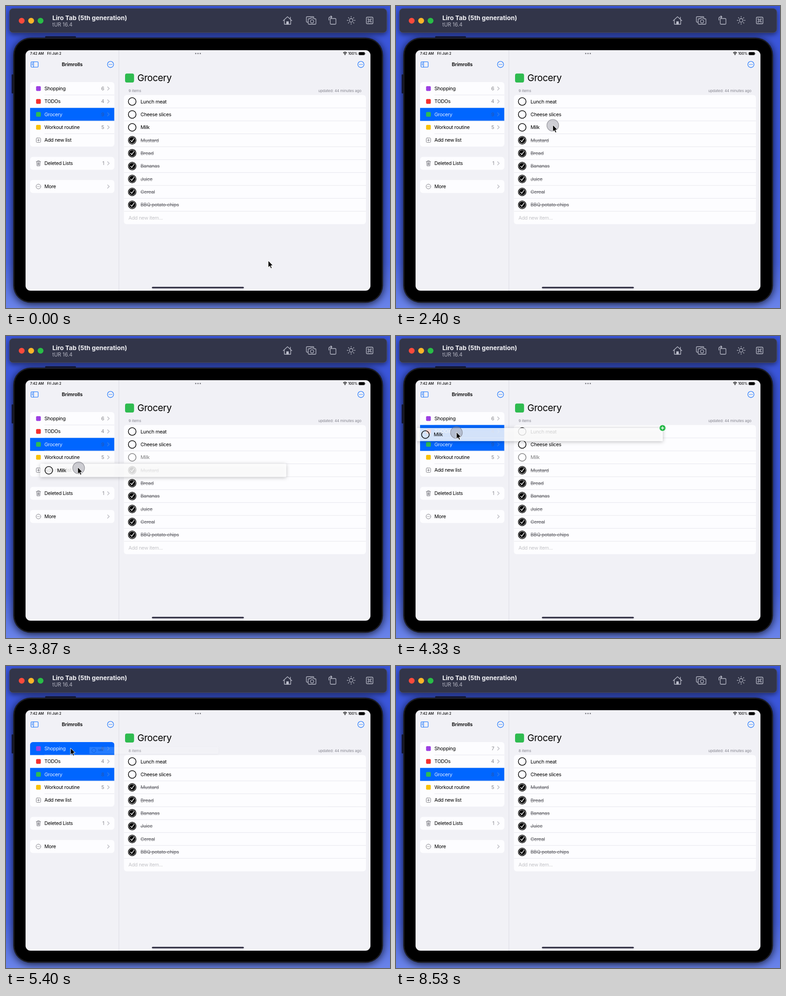
Recreate the animation shown at these times as an HTML page. Size 845 by 663 pixels, loop 8.59 s.

```html
<!DOCTYPE html>
<html lang="en">
<head>
<meta charset="utf-8">
<title>Drag an item to another list</title>
<style>
  html, body { margin: 0; width: 100%; height: 100%; overflow: hidden; background: #3a57dc; }
  svg { display: block; width: 845px; height: 663px; }
  text { font: 400 10.9px Inter, "Open Sans", sans-serif; letter-spacing: -.028em; white-space: pre; }
  .name { font-size: 13.7px; font-weight: 700; fill: #f4f4f8; letter-spacing: 0; }
  .ver { font-size: 11.3px; fill: #b6b7c4; letter-spacing: 0; }
  .stat { font-size: 7.7px; font-weight: 500; letter-spacing: -.01em; }
  .bold { font-weight: 600; letter-spacing: -.01em; }
  .big { font-size: 20.6px; letter-spacing: -.023em; }
  .note { font-size: 8.2px; fill: #85858f; letter-spacing: -.01em; }
  .done { fill: #6c6c72; text-decoration: line-through; }
  .hint { fill: #c3c3c7; }
  .num { fill: #85858b; }
  .line { stroke: #dcdce4; stroke-width: .7; }
  .chev { fill: none; stroke: #b4b4bc; stroke-width: 1.3; stroke-linecap: round; stroke-linejoin: round; }
  .tool { fill: none; stroke: #bcbecb; stroke-width: 1.3; stroke-linejoin: round; stroke-linecap: round; }
  .blue { fill: none; stroke: #0a6cff; stroke-width: 1.1; }
  .gray { fill: none; stroke: #77777e; stroke-width: 1; stroke-linecap: round; }
  .on .label { fill: #e4eeff; }
  .on .num { fill: #2856a8; }
  .on .chev { stroke: #3c82e6; }
</style>
</head>
<body>
<svg id="stage" viewBox="0 0 845 663">
  <defs>
    <linearGradient id="sky" x1="0" y1="0" x2="0" y2="1">
      <stop offset="0" stop-color="#3a55da"/>
      <stop offset=".5" stop-color="#3d5ae0"/>
      <stop offset=".85" stop-color="#4a66e4"/>
      <stop offset="1" stop-color="#6a84ea"/>
    </linearGradient>
    <filter id="deep" x="-5%" y="-5%" width="110%" height="112%">
      <feDropShadow dx="0" dy="3" stdDeviation="9" flood-opacity=".8"/>
    </filter>
    <filter id="barShade" x="-5%" y="-40%" width="110%" height="200%">
      <feDropShadow dx="0" dy="4" stdDeviation="6" flood-opacity=".5"/>
    </filter>
    <filter id="soft" x="-5%" y="-80%" width="110%" height="260%">
      <feDropShadow dx="0" dy="1.5" stdDeviation="4.5" flood-opacity=".32"/>
    </filter>
    <clipPath id="listClip"><rect x="53" y="167" width="185.5" height="141.8" rx="6"/></clipPath>
  </defs>

  <rect width="845" height="663" fill="url(#sky)"/>

  <!-- device -->
  <rect x="16" y="69.5" width="813.5" height="582" rx="38" fill="#15161c" filter="url(#deep)"/>
  <rect x="86" y="66.5" width="68" height="3" rx="1.5" fill="#12152c"/>
  <rect x="12.5" y="150" width="3.5" height="42" rx="1.5" fill="#12152c"/>
  <rect x="18" y="71.5" width="809.5" height="578" rx="36" fill="#000" stroke="#30313a" stroke-width=".8"/>
  <rect x="43" y="97" width="759" height="528" rx="11" fill="#f1f1f6"/>
  <path d="M248.5 97V625" stroke="#dcdce3" stroke-width="1"/>
  <rect x="321" y="616.5" width="202.5" height="3.6" rx="1.8" fill="#353347"/>

  <!-- simulator bar -->
  <rect x="7.5" y="5.5" width="830.5" height="53" rx="8" fill="#323449" stroke="#474a63" stroke-width="1" filter="url(#barShade)"/>
  <circle cx="34.5" cy="32.3" r="6.4" fill="#fb4a3c"/>
  <circle cx="55.3" cy="32.3" r="6.4" fill="#fab529"/>
  <circle cx="76" cy="32.3" r="6.4" fill="#29bd47"/>
  <text class="name" x="102" y="30.5">Liro Tab (5th generation)</text>
  <text class="ver" x="102" y="45">tUR 16.4</text>
  <g class="tool">
    <path d="M610 32.2L619.5 23.5L629 32.2M612.5 30.5V40H626.5V30.5M625.8 28.5V24.5"/>
    <path d="M617.5 40V34.5H621.5V40Z" fill="#bcbecb"/>
    <path d="M664 35.5H662.5Q661 35.5 661 34V25Q661 23.5 662.5 23.5H676Q677.5 23.5 677.5 25"/>
    <path d="M666.5 28H669L670.5 26.3H676.5L678 28H680.5Q682 28 682 29.5V38.5Q682 40 680.5 40H666.5Q665 40 665 38.5V29.5Q665 28 666.5 28Z"/>
    <circle cx="673.5" cy="33.7" r="3.6"/>
    <rect x="713.5" y="27.5" width="12.5" height="12.5" rx="1.5"/>
    <path d="M710.5 31V27.5Q710.5 24 714 24H717M714.8 21.5L717.3 24L714.8 26.5"/>
    <circle cx="759.5" cy="31.5" r="4"/>
    <path id="rays"/>
    <rect x="793" y="24.5" width="14.5" height="14.5" rx="2"/>
    <path stroke-width="1" d="M798.5 30H802V33.5H798.5ZM798.5 30H797.2A1.3 1.3 0 1 1 798.5 28.7ZM802 30V28.7A1.3 1.3 0 1 1 803.3 30ZM802 33.5H803.3A1.3 1.3 0 1 1 802 34.8ZM798.5 33.5V34.8A1.3 1.3 0 1 1 797.2 33.5Z"/>
  </g>

  <!-- status bar -->
  <text class="stat" x="53" y="107">7:42 AM</text>
  <text class="stat" x="90.5" y="107">Fri Jun 2</text>
  <g fill="#808087"><circle cx="417.5" cy="104.3" r="1.5"/><circle cx="422.5" cy="104.3" r="1.5"/><circle cx="427.5" cy="104.3" r="1.5"/></g>
  <g fill="none" stroke="#000" stroke-width="1.3">
    <path d="M742 103Q746 99.3 750 103M743.5 104.8Q746 102.5 748.5 104.8"/>
    <circle cx="746" cy="106.5" r=".5"/>
  </g>
  <text class="stat" x="753" y="107">100%</text>
  <rect x="776" y="101.3" width="13.5" height="6.4" rx="1.8" fill="#000"/>
  <path d="M790.7 103.3V105.7" stroke="#777" stroke-width="1"/>

  <!-- navigation -->
  <g class="blue">
    <rect x="55" y="122.5" width="15.8" height="11.8" rx="1.8"/>
    <path d="M60.7 122.5V134.3M57 125H59M57 127.2H59M57 129.4H59"/>
  </g>
  <text class="bold" x="145.7" y="132.2" text-anchor="middle">Brimrolls</text>
  <g id="nav"></g>
  <rect x="262" y="148.3" width="19.8" height="19.6" rx="4" fill="#2fbb50"/>
  <text class="big" x="289" y="165.3">Grocery</text>
  <text class="note" id="total" x="269.8" y="189.3">9 items</text>
  <text class="note" x="782" y="189.3" text-anchor="end">updated: 44 minutes ago</text>

  <rect x="53" y="167" width="185.5" height="141.8" rx="6" fill="#fdfdff"/>
  <g id="side" clip-path="url(#listClip)"></g>
  <g id="extra"></g>

  <rect id="card" x="259.5" y="195.5" width="532.5" height="283.5" rx="6" fill="#fdfdff"/>
  <g id="items"></g>

  <g id="ghost">
    <rect width="541" height="28.8" rx="1.5" fill="#fff" fill-opacity=".8" filter="url(#soft)"/>
    <circle cx="18.7" cy="14.4" r="8.4" fill="none" stroke="#000" stroke-width="1.5"/>
    <text x="37" y="18.3">Milk</text>
  </g>
  <g id="badge">
    <circle r="7" fill="#27b84a" stroke="#f2faf4" stroke-width="1"/>
    <path d="M-3.5 0H3.5M0 -3.5V3.5" stroke="#fff" stroke-width="1.5"/>
  </g>
  <circle id="touch" r="13" fill="#8c8c98" fill-opacity=".42" stroke="#77777f" stroke-opacity=".75" stroke-width="1.2"/>
  <path id="arrow" d="M0 0V15L3.4 11.9L5.9 17.3L8.3 16.2L5.9 11L10.3 10.7Z" fill="#000" stroke="#fff" stroke-width="1"/>
</svg>

<script>
const LOOP = 8590, ROW = 28.35;
const PRESS = 2200, LIFT = 2700, DROP = 5230, SETTLE = 5600, GONE = 8500;
const NS = "http://www.w3.org/2000/svg";
const $ = id => document.getElementById(id);

function add(parent, tag, attrs, text) {
  const el = document.createElementNS(NS, tag);
  for (const k in attrs) el.setAttribute(k, attrs[k]);
  if (text !== undefined) el.textContent = text;
  parent.appendChild(el);
  return el;
}
const label = (g, x, y, text, cls = "label", extra = {}) =>
  add(g, "text", { x, y: y + 3.9, class: cls, ...extra }, text);
const chevron = (g, y) =>
  add(g, "path", { class: "chev", d: `M223.5 ${y - 3.7}l3.7 3.7l-3.7 3.7` });
const count = (g, y, n) => label(g, 216, y, n, "num", { "text-anchor": "end" });

function dots(g, cx, cy, r, color, cls) {
  add(g, "circle", { cx, cy, r, class: cls });
  for (const d of [-1, 0, 1])
    add(g, "circle", { cx: cx + d * r * .43, cy, r: r * .13, fill: color });
}

// toolbar and navigation details
let rays = "";
for (let i = 0; i < 8; i++) {
  const a = i * Math.PI / 4, c = Math.cos(a), s = Math.sin(a);
  rays += `M${759.5 + 7 * c} ${31.5 + 7 * s}L${759.5 + 8.7 * c} ${31.5 + 8.7 * s}`;
}
$("rays").setAttribute("d", rays);
dots($("nav"), 230, 128.3, 6.8, "#0a6cff", "blue");
dots($("nav"), 781, 128.3, 6.8, "#0a6cff", "blue");

// sidebar
const lists = [
  ["Shopping", 6, "#9c40e2"], ["TODOs", 4, "#f62f2d"],
  ["Grocery", 9, "#2fbb50"], ["Workout routine", 5, "#f9c108"]
].map(([name, n, color], i) => {
  const g = add($("side"), "g", {}), y = 167 + ROW * (i + .5);
  const fill = add(g, "rect", { x: 53, y: y - ROW / 2, width: 185.5, height: ROW + .2, fill: "#0066ff" });
  add(g, "path", { class: "line", d: `M84.5 ${y + ROW / 2}H238.5` });
  add(g, "rect", { x: 66.2, y: y - 5.2, width: 10.4, height: 10.4, rx: 2.2, fill: color });
  label(g, 84.5, y, name);
  chevron(g, y);
  return { g, fill, num: count(g, y, n) };
});
const addY = 167 + ROW * 4.5;
add($("side"), "rect", { class: "gray", x: 66.6, y: addY - 4.8, width: 9.6, height: 9.6, rx: 1.8 });
add($("side"), "path", { class: "gray", d: `M69 ${addY}h4.8m-2.4 -2.4v4.8` });
label($("side"), 84.5, addY, "Add new list");

for (const [name, y] of [["Deleted Lists", 345.4], ["More", 396.3]]) {
  const g = $("extra");
  add(g, "rect", { x: 53, y: y - 14.2, width: 185.5, height: 28.4, rx: 6, fill: "#fdfdff" });
  label(g, 84.5, y, name);
  chevron(g, y);
}
count($("extra"), 345.4, 1);
add($("extra"), "path", { class: "gray", d: "M66.5 341.5H76.3M69.5 341.5V339.7H73.3V341.5M67.5 341.5L68.2 351H74.6L75.3 341.5M69.9 343.7V349M71.4 343.7V349M72.9 343.7V349" });
dots($("extra"), 71.4, 396.3, 5.2, "#77777e", "gray");

// grocery items
const names = ["Lunch meat", "Cheese slices", "Milk", "Mustard", "Bread", "Bananas", "Juice", "Cereal", "BBQ potato chips"];
const MILK = 2;
const rows = names.map((name, i) => {
  const g = add($("items"), "g", {}), done = i > MILK;
  add(g, "path", { class: "line", d: `M260 ${ROW / 2}H792` });
  const body = add(g, "g", {});
  add(body, "circle", { cx: 277.7, cy: 0, r: 8.4, fill: done ? "#fff" : "none", stroke: "#000", "stroke-width": 1.5 });
  if (done) {
    add(body, "circle", { cx: 277.7, cy: 0, r: 6.9, fill: "#000" });
    add(body, "path", { d: "M274.2 .3L276.8 3.2L281.3 -3.5", fill: "none", stroke: "#fff", "stroke-width": 1.5, "stroke-linecap": "round" });
  }
  label(body, 296, 0, name, done ? "done" : "label");
  return { g, body };
});
const hint = add($("items"), "g", {});
label(hint, 269.5, 0, "Add new item...", "hint");

// pointer track: time, x, y
const track = [
  [0, 577, 559], [70, 577, 559], [600, 520, 478], [1200, 400, 325], [1750, 345, 261],
  [2900, 345, 261], [3070, 342, 293], [3150, 336, 304], [3870, 158, 288],
  [4270, 133, 211], [4400, 133, 211], [4800, 140, 183], [5100, 142, 180], [6680, 142, 180],
  [7100, 190, 228], [7600, 282, 335], [8200, 470, 545], [8440, 526, 602], [8590, 548, 680]
];
const slope = (i, k) => (track[i + 1][k] - track[i][k]) / (track[i + 1][0] - track[i][0]);
function tangent(i, k) {
  if (i === 0 || i === track.length - 1) return 0;
  const a = slope(i - 1, k), b = slope(i, k);
  return a * b <= 0 ? 0 : 2 * a * b / (a + b);
}
function pointer(t) {
  t = Math.max(0, Math.min(t, LOOP - .01));
  let i = 0;
  while (t >= track[i + 1][0]) i++;
  const h = track[i + 1][0] - track[i][0], u = (t - track[i][0]) / h, v = 1 - u;
  return [1, 2].map(k =>
    track[i][k] * (1 + 2 * u) * v * v + tangent(i, k) * h * u * v * v +
    track[i + 1][k] * u * u * (3 - 2 * u) - tangent(i + 1, k) * h * u * u * v);
}

const ramp = (t, a, b) => Math.max(0, Math.min(1, (t - a) / (b - a)));
const ease = u => u * u * (3 - 2 * u);
const move = (el, x, y, s = "") => el.setAttribute("transform", `translate(${x} ${y})${s}`);
const fade = (el, o) => el.setAttribute("opacity", o);

function draw(t) {
  const [x, y] = pointer(t);
  move($("arrow"), x, y);
  fade($("arrow"), t < GONE ? 1 : 0);

  const [cx, cy] = pointer(t - 18);
  move($("touch"), cx, cy + 1);
  fade($("touch"), ramp(t, PRESS, PRESS + 100) * (1 - ramp(t, DROP - 40, DROP + 60)));

  // list under the dragged item
  let over = -1;
  if (t > LIFT && t < SETTLE && x > 53 && x < 238) over = Math.floor((y - 167) / ROW);
  const target = over >= 0 && over < 4 && over !== 2;
  lists.forEach((l, i) => {
    const on = i === 2 || i === over;
    l.g.setAttribute("class", on ? "on" : "");
    fade(l.fill, on ? 1 : 0);
  });
  lists[0].num.textContent = t < SETTLE - 100 ? 6 : 7;
  lists[2].num.textContent = t < DROP ? 9 : 8;
  $("total").textContent = (t < DROP ? 9 : 8) + " items";

  // drag preview
  const lift = ease(ramp(t, LIFT, LIFT + 150)), p = ramp(t, DROP, DROP + 360);
  const [gx, gy] = pointer(t - 38), s = (.983 + .017 * lift) * (1 - p);
  move($("ghost"), gx - 87 + 270.5, gy - 9 + 14.4, ` scale(${s}) translate(-270.5 -14.4)`);
  fade($("ghost"), lift * Math.pow(1 - p, 2.7));
  move($("badge"), gx + 453.5, gy - 9);
  fade($("badge"), target && t < DROP ? 1 : 0);

  // items close the gap
  const shut = ease(ramp(t, DROP, DROP + 150)), first = 195.5 + ROW / 2;
  rows.forEach((r, i) => move(r.g, 0, first + ROW * (i - (i > MILK ? shut : 0))));
  fade(rows[MILK].body, (1 - .5 * lift) * (1 - shut));
  fade(rows[MILK].g, shut < 1 ? 1 : 0);
  move(hint, 0, first + ROW * (9 - shut));
  $("card").setAttribute("height", ROW * (10 - shut));
}

function tick() {
  draw(performance.now() % LOOP);
  requestAnimationFrame(tick);
}
tick();
</script>
</body>
</html>
```
